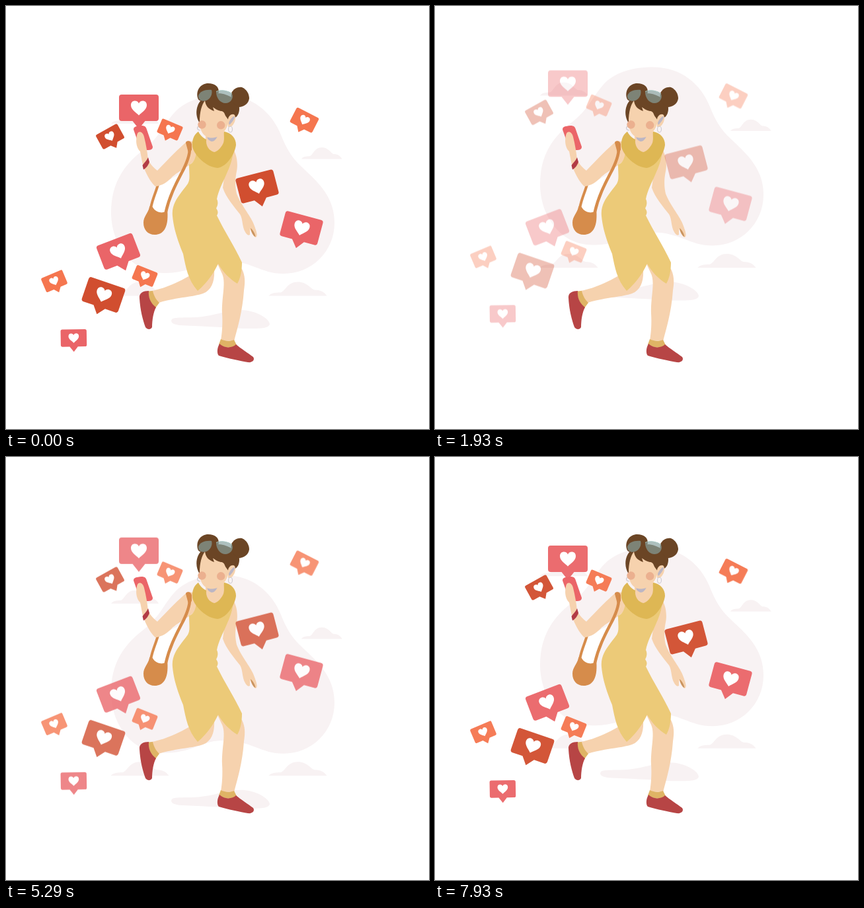
Write an HTML page that moves like this. It is 640 px wide and 640 px high and loops after 8 s.

```html
<!DOCTYPE html>
<html lang="en">
<head>
<meta charset="utf-8">
<title>Likes</title>
<style>
html, body { margin: 0; width: 100%; height: 100%; overflow: hidden; background: #fff; }
svg { display: block; width: 100%; height: 100%; }
.skin { fill: #f6d2ae; }
.hair { fill: #6b4525; }
.dress { fill: #ecca78; }
.scarf { fill: #deb754; }
.sock { fill: #dfb465; }
.shoe { fill: #b74545; }
.bag { fill: #d68c4b; }
.strap { fill: none; stroke: #d68c4b; stroke-linecap: round; }
.phone { fill: #eb6568; }
.cheek { fill: #ebb08f; }
.ring { fill: none; stroke: #cfcdd3; stroke-width: 1.2; }
.grey { fill: #bcb6c4; }
.lens { fill: #86a19d; opacity: .68; }
</style>
</head>
<body>
<svg viewBox="0 0 640 640">
  <defs>
    <path id="cloud" d="M0 0C3-4 9-5 18-5C25-7 28-21 44-21C58-21 63-11 69-9C78-9 84-6 88 0Z"/>
    <path id="heart" d="M0 11.5C-4 7-12 3-12-4C-12-8.5-9-10.5-6-10.5C-3-10.5-1-9 0-6.5C1-9 3-10.5 6-10.5C9-10.5 12-8.5 12-4C12 3 4 7 0 11.5Z"/>
    <path id="box" d="M-26-20H26Q30-20 30-16V16Q30 20 26 20H9.5L0 32L-9.5 20H-26Q-30 20-30 16V-16Q-30-20-26-20Z"/>
  </defs>

  <g id="scene" fill="#f8f2f3">
    <path d="M330 135C372 135 402 160 416 195C424 215 432 229 447 243C470 265 497 287 497 328C497 372 462 405 420 405C385 405 370 385 330 385C295 385 285 404 238 404C190 404 159 360 159 312C159 270 177 242 205 220C235 197 238 178 258 158C275 142 300 135 330 135Z"/>
    <path d="M250 476C251 470 264 472 285 471C315 470 330 460 355 460C378 460 398 473 399 481C398 489 380 488 358 488C325 486 290 484 262 483C254 482 250 480 250 476Z"/>
    <use href="#cloud" transform="translate(159 178) scale(.82 .95)"/>
    <use href="#cloud" transform="translate(447 231.5) scale(.7 .83)"/>
    <use href="#cloud" transform="translate(397.500 438.500)"/>
    <use href="#cloud" transform="translate(158.500 438.500)"/>
  </g>

  <!-- legs -->
  <path class="skin" d="M278 408C262 417 240 428 220 431C219 441 224 449 231 449C255 441 280 441 298 435C312 430 316 415 315 398L296 396Z"/>
  <path class="sock" d="M215 431.500L222 431C224 440 228 445 232 449L226 457C219 450 215 441 215 431.500Z"/>
  <path class="shoe" d="M216 431C208 431 201 434 202 442C203 460 207 475 211 486C214 490 219 490 221 486C221 475 223 463 227 456C219 450 215 441 216 431Z"/>
  <path class="skin" d="M319 388L326 403C334 417 326 440 327 465C328 480 327 495 325 506L345 507C350 488 358 462 360 430C362 418 362 408 357 398L340 385Z"/>
  <path class="sock" d="M325 504C331 507 339 508 345 505L349 513C343 518 332 518 322 512Z"/>
  <path class="shoe" d="M323 511C319 518 319 526 322 529C335 533 355 537 366 539C373 540 377 535 374 531C366 525 355 518 348 512C342 518 330 518 323 511Z"/>

  <!-- bag and arms -->
  <path fill="#fff" d="M231 271L221 306C226 313 236 314 242 311C246 293 256 270 264 254Z"/>
  <path class="strap" stroke-width="4" d="M230 270C227 282 222 290 219 306"/>
  <path class="phone" d="M193 187C193 182 197 182 205 181C210 181 212 183 213 187L222 213C222 217 219 218 214 218L204 218Z"/>
  <path class="skin" d="M275 204C258 218 242 236 229 249C222 244 218 238 215 233C214 222 212 210 209 198C207 189 199 188 198 196C196 204 197 214 203 220C205 230 206 236 207 240C211 252 218 266 226 273C236 272 245 266 252 258C262 250 270 246 278 240L300 222L290 206Z"/>
  <path fill="#b23b45" d="M215 229L217 236C215 242 211 246 208 247.500L206.500 241C209 237 213 234 215 229Z"/>
  <path class="skin" d="M342 214C350 224 351 240 349 250C346 265 347 275 349 284C355 300 370 318 374 328C378 338 381 346 379 349C376 353 372 343 369 337L369 346C366 349 362 343 360 338C357 328 358 322 354 315C344 302 333 290 328 275C330 258 334 240 336 222Z"/>
  <path fill="#c9935f" d="M370 336C374 339 377 345 377.500 349C374 348 371 342 370 336Z"/>

  <path class="dress" d="M288 218C288 230 283 239 277 240C277 255 279 262 275 269C262 287 250 298 252 318C254 340 262 360 268 375C272 395 275 414 290 431C303 420 314 405 321 390C328 402 338 413 350 420C355 412 357 400 357 388C345 362 330 340 319 317C322 312 320 309 318 306C321 301 321 296 319 292C323 270 343 244 344 218Z"/>
  <path class="strap" stroke-width="4.500" d="M277 207C281 220 274 237 266 252C256 271 247 289 242 311"/>
  <path class="bag" d="M272 207C272 203 280 203 281 209L281 218L276 222Z"/>
  <path class="bag" d="M217 304C219 300 221 303 223 306C227 312 236 314 241 311L244 306C245 318 245 330 240 338C236 344 231 346 225 346C214 346 208 338 208 328C208 318 215 314 217 304Z"/>

  <!-- neck, scarf and head -->
  <path class="skin" d="M302 190H332V214L316 224L302 212Z"/>
  <path class="scarf" d="M291 190C284 195 281 203 282 213C285 226 303 244 320 245C335 243 347 222 348 210C348 200 341 192 330 190C329 195 331 200 329 207C325 216 318 221 315 221C307 219 302 211 303 202C297 199 293 194 291 190Z"/>
  <path class="grey" d="M304 198C309 200 315 199 320 196.500C318 202 315 205 311 205C308 204 305 202 304 198Z"/>
  <path class="hair" d="M293 177C285 165 287 147 300 138C318 125 345 135 352 149C355 158 351 169 345 169L330 176Z"/>
  <path class="hair" d="M290 139C287 127 295 117 306 117C316 117 322 122 322 130C320 138 307 145 299 144C294 144 291 143 290 139Z"/>
  <path class="hair" d="M341 132C344 125 351 122 357 123C364 126 368 133 368 140C367 148 359 153 352 153C345 150 339 142 341 132Z"/>
  <path class="skin" d="M301 143C296 150 293 160 293 175C293 190 300 200 312 199.500C325 199 335 188 337 173L332 166C330 161 329 159 325 159C320 158 317 156 313 153L315 159C306 156 302 151 301 143Z"/>
  <path class="skin" d="M336 171C337 165 343 162 346 165C349 171 345 180 340 183L336 183Z"/>
  <path class="grey" d="M337 177C339 171 343 167 346 167C346 171 342 176 338 180Z"/>
  <ellipse class="ring" cx="339.500" cy="186.500" rx="3" ry="4.500"/>
  <path class="ring" d="M291 182C288 185 290 188 294 188"/>
  <circle class="cheek" cx="296.500" cy="179.500" r="6.200"/>
  <circle class="cheek" cx="325.200" cy="180.300" r="6.200"/>
  <path class="lens" d="M291 136C293 129 302 126 311 127C313 133 309 141 303 143C297 145 291 143 291 136Z"/>
  <path class="lens" d="M318 130C323 126 337 128 342 133C345 139 340 147 332 147C324 147 318 139 318 130Z"/>
  <path fill="none" stroke="#a9c9c5" d="M318 129.500C324 126 337 128 342 133"/>

  <g id="likes"></g>
</svg>
<script>
const PINK = '#ea6568', RED = '#d14e2f', ORANGE = '#f5764f';
// x, y, scale, angle, colour
const bubbles = [
  [201, 154, 1, 0, PINK],
  [157.5, 197.5, .62, -29, RED],
  [248, 187, .57, 23, ORANGE],
  [451.5, 172.7, .63, 27, ORANGE],
  [380, 273, .98, -14.5, RED],
  [447, 336, .98, 15, PINK],
  [170, 371.3, .97, -21, PINK],
  [210, 408.3, .57, 22, ORANGE],
  [147.5, 437, .97, 19, RED],
  [73, 416.2, .58, -23, ORANGE],
  [102.4, 502.3, .655, -1, PINK]
];
const LOOP = 8, FPS = 14, HALF = 2.965;
const scene = document.getElementById('scene');
const likes = document.getElementById('likes');

likes.innerHTML = bubbles.map(([x, y, size, angle, color]) =>
  `<g transform="translate(${x} ${y}) rotate(${angle}) scale(${size})">
    <use href="#box" fill="${color}"/><use href="#heart" fill="#fff"/>
  </g>`).join('');

// Linear interpolation through [time, value] pairs
function track(keys, t) {
  let i = 1;
  while (i < keys.length - 1 && t > keys[i][0]) i++;
  const [t0, a] = keys[i - 1], [t1, b] = keys[i];
  return a + (b - a) * (t - t0) / (t1 - t0);
}

const drift = [[0, 0], [2, -44], [5.97, 62], [LOOP, 0]];
const rise = [[0, 0], [HALF, -56.3], [2 * HALF, 0], [LOOP, 0]];
const fade = [[0, 1], [HALF, 0], [2 * HALF, 1], [6.3, 0], [6.39, 0], [LOOP, 1]];

function draw(now) {
  const t = Math.floor(now / 1000 % LOOP * FPS + .02) / FPS;
  scene.setAttribute('transform', `translate(0 ${track(drift, t)})`);
  likes.setAttribute('transform', `translate(0 ${track(rise, t)})`);
  likes.setAttribute('opacity', track(fade, t));
}

const start = performance.now();
function tick() {
  draw(performance.now() - start);
  requestAnimationFrame(tick);
}
tick();
</script>
</body>
</html>
```
